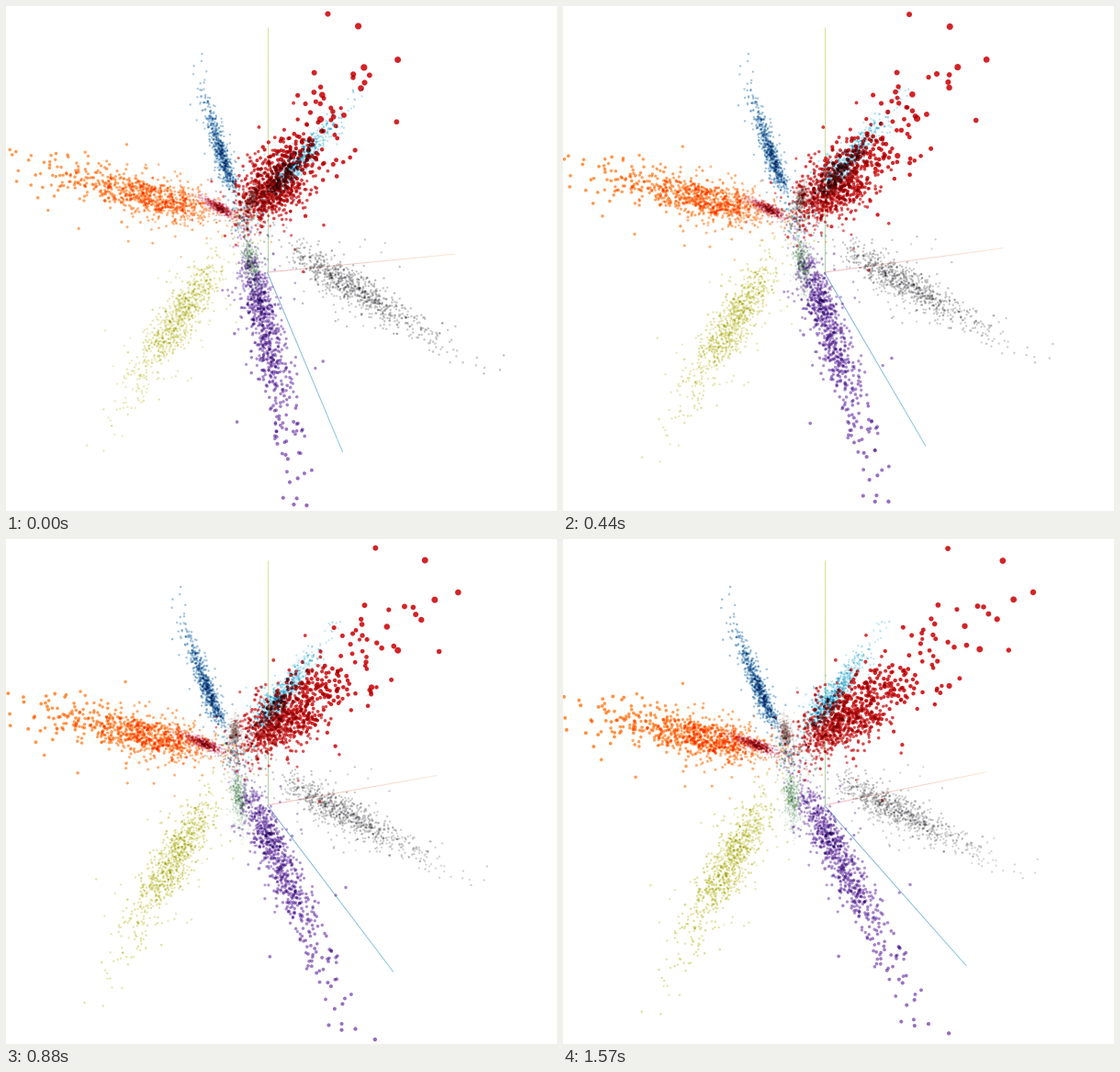
Animation of 600 by 550 pixels, one loop 1600 ms. Source, as a matplotlib script:

```python
import numpy as np
import matplotlib.pyplot as plt
from matplotlib.animation import FuncAnimation
from matplotlib.collections import LineCollection

W, H = 600, 550
LOOP, STEP = 1600, 20

# Camera: orbit centre on screen, focal length, distance and elevation
CX, CY = 284.5, 290
FOCAL, DIST = 434, 1.906
SIN_E, COS_E = 0.482, 0.876
START = 11.43


def smooth(u):
    return u * u * (3 - 2 * u)


# The orbit advances in bursts: start ms, end ms, steps, final degrees, easing
BURSTS = [
    (30, 530, 14, 16.23, lambda u: u ** 0.48),
    (660, 1180, 10, 21.08, lambda u: smooth(min(1, 1.75 * u))),
    (1210, 1570, 8, 23.1, lambda u: u),
]

# Every cluster is a spindle leaving the hub along its axis
HUB = np.array([-0.13, 0.14, -0.31])
# colour, count, axis, sideways spread
CLUSTERS = [
    ((208, 24, 28), 880, (0.30, 0.72, 1.13), 0.051),
    ((140, 95, 188), 800, (0.23, -0.37, 1.26), 0.034),
    ((255, 127, 30), 850, (-0.76, 0.47, 0.63), 0.044),
    ((110, 110, 115), 820, (1.20, -0.63, 0.38), 0.045),
    ((188, 189, 34), 850, (-0.74, -1.02, 0.45), 0.054),
    ((25, 110, 172), 650, (-0.23, 0.65, -0.36), 0.019),
    ((15, 165, 208), 680, (0.60, 0.52, -0.45), 0.031),
    ((200, 25, 65), 560, (-0.36, -0.05, -0.62), 0.014),
    ((130, 88, 80), 400, (0.08, -0.04, -0.96), 0.019),
    ((90, 150, 100), 480, (0.07, -0.78, -0.42), 0.025),
]

# Axis direction, colour at the origin, colour at the tip
AXES = [
    ((1, 0, 0), (242, 185, 185), (250, 232, 212)),
    ((0, 1, 0), (165, 208, 165), (220, 227, 150)),
    ((0, 0, 1), (120, 168, 215), (140, 198, 222)),
]


def project(pts, degrees):
    """Turn about the vertical axis; return screen x, y and distance."""
    s, c = np.sin(np.radians(degrees)), np.cos(np.radians(degrees))
    x, y, z = pts.T
    a, z = x * c + z * s, z * c - x * s
    m = np.maximum(DIST - y * SIN_E - z * COS_E, 0.4)
    up = y * COS_E - z * SIN_E
    return CX + FOCAL * a / m, CY - FOCAL * up / m, m


def make_cloud():
    rng = np.random.default_rng(11)
    pts, cols = [], []
    for col, n, axis, side in CLUSTERS:
        # Skewed bell along the axis, plus a thin haze near the hub
        g = rng.normal(size=n)
        t = np.clip(0.48 + 0.16 * (g + 0.15 * g * g), 0, 1.08)
        t = np.where(rng.random(n) < 0.08, rng.uniform(-0.05, 0.5, n), t)
        wide = np.where(rng.random(n) < 0.12, 2.0, 0.9)
        off = rng.normal(0, side, (n, 3)) * wide[:, None]
        pts.append(HUB + t[:, None] * np.array(axis) + off)
        cols += [col] * n
    return np.concatenate(pts), np.array(cols) / 255


def stamp(total, x, y, r, ink, half):
    """Add the log transmission of soft-edged discs to the total."""
    k = np.arange(-half, half + 1)
    px = np.floor(x).astype(int)[:, None, None] + k[None, None, :]
    py = np.floor(y).astype(int)[:, None, None] + k[None, :, None]
    dist = np.hypot(px + 0.5 - x[:, None, None], py + 0.5 - y[:, None, None])
    cover = np.clip(r[:, None, None] + 0.5 - dist, 0, 1)
    hit = (cover > 0) & (px >= 0) & (px < W) & (py >= 0) & (py < H)
    cell = (py * W + px)[hit]
    who = np.nonzero(hit)[0]
    cover = cover[hit]
    for ch in range(3):
        logs = np.log1p(-cover * ink[who, ch])
        total[:, ch] += np.bincount(cell, logs, W * H)


def render(degrees):
    """Multiply all discs together, as an RGBA layer for a white ground."""
    x, y, m = project(CLOUD, degrees - START)
    r = 2.45 / m
    fog = np.clip(1.6 - 0.58 * m, 0.16, 0.95)
    ink = fog[:, None] * (1 - COLORS)
    total = np.zeros((W * H, 3))
    for lo, hi, half in [(0, 1.5, 2), (1.5, 2.5, 3), (2.5, 9, 7)]:
        g = (r >= lo) & (r < hi)
        stamp(total, x[g], y[g], r[g], ink[g], half)
    light = np.exp(total)
    low = light.min(axis=1, keepdims=True)
    alpha = 1 - low
    rgb = (light - low) / np.maximum(alpha, 1e-6)
    return np.hstack([rgb, alpha]).clip(0, 1).reshape(H, W, 4)


def axis_segments(degrees):
    t = np.linspace(0, 1, 25)[:, None]
    segs = []
    for direction, _, _ in AXES:
        x, y, _ = project(t * np.array(direction), degrees)
        line = np.column_stack([x, y])
        segs += list(np.stack([line[:-1], line[1:]], axis=1))
    return segs


def axis_colors():
    t = np.linspace(0, 1, 24)[:, None]
    return np.concatenate([
        (np.array(a) * (1 - t) + np.array(b) * t) / 255 for _, a, b in AXES])


def angle_at(ms):
    degrees = START
    for begin, end, steps, final, ease in BURSTS:
        if ms < begin:
            break
        done = 1 + int((ms - begin) / (end - begin) * (steps - 1))
        degrees += (final - degrees) * ease(min(done / steps, 1))
    return degrees


CLOUD, COLORS = make_cloud()

fig = plt.figure(figsize=(W / 100, H / 100), dpi=100, facecolor="white")
ax = fig.add_axes([0, 0, 1, 1])
ax.axis("off")
lines = LineCollection(axis_segments(START), colors=axis_colors(),
                       linewidths=0.72, capstyle="butt", zorder=1)
ax.add_collection(lines)
layer = ax.imshow(render(START), extent=(0, W, H, 0),
                  interpolation="nearest", zorder=2)
ax.set_xlim(0, W)
ax.set_ylim(H, 0)


def update(i):
    degrees = angle_at(i * STEP + STEP / 2)
    lines.set_segments(axis_segments(degrees))
    layer.set_data(render(degrees))
    return lines, layer


anim = FuncAnimation(fig, update, frames=LOOP // STEP, interval=STEP,
                     repeat=True, repeat_delay=0, blit=False)
plt.show()
```
